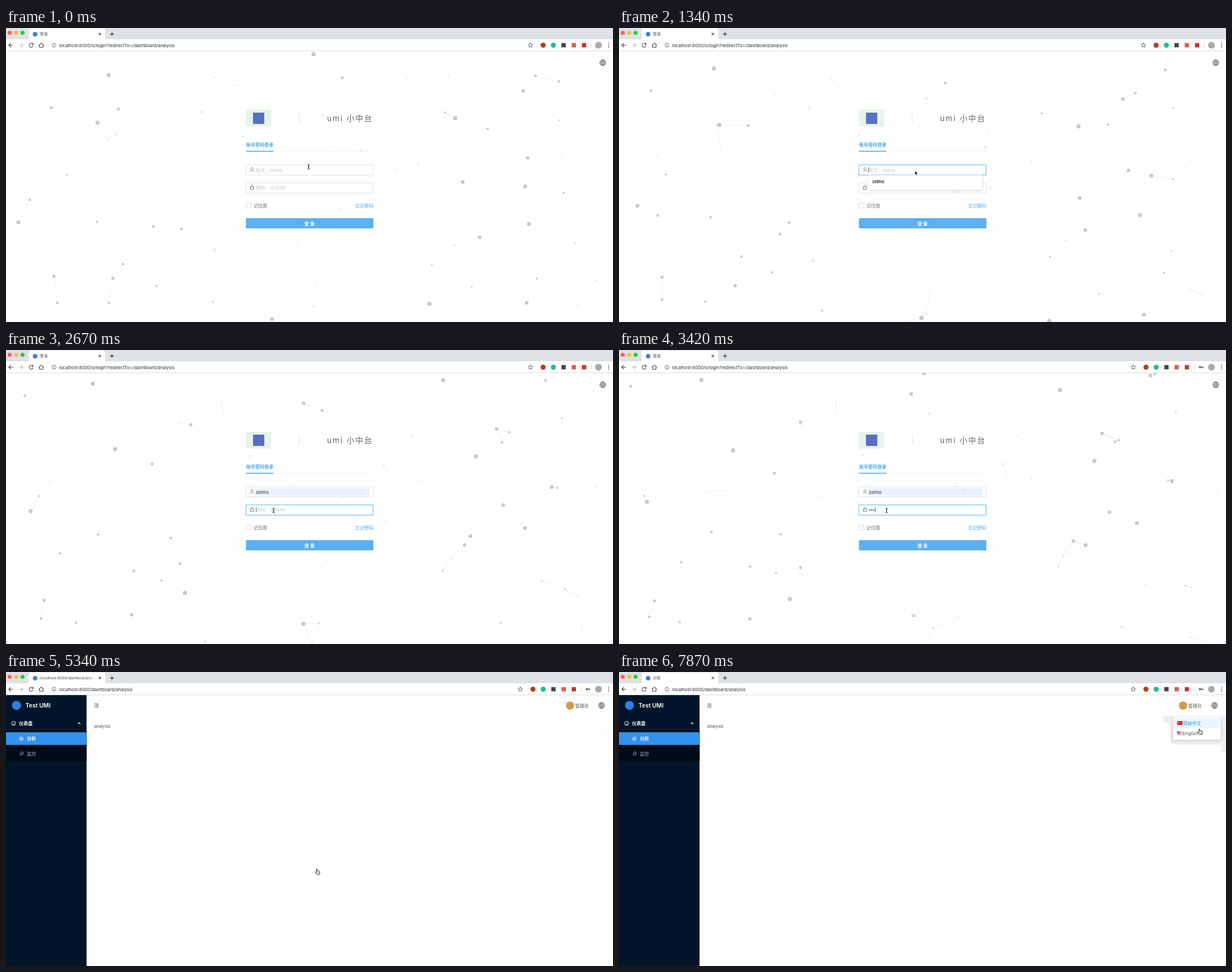
An HTML page with a canvas that plays this animation: 1074x521 px, repeating every 8 s.

```html
<!DOCTYPE html>
<html lang="zh">
<head>
<meta charset="utf-8">
<title>登录</title>
<style>
html, body { margin: 0; width: 100%; height: 100%; overflow: hidden; background: #fefefe; }
#stage { position: relative; width: 1074px; height: 521px; overflow: hidden; }
canvas { position: absolute; left: 0; top: 0; }
#words span {
  position: absolute; line-height: 0; white-space: pre;
  font-family: Inter, "Noto Sans CJK SC", "Noto Sans CJK", sans-serif;
}
</style>
</head>
<body>
<div id="stage">
  <canvas id="base" width="1074" height="521"></canvas>
  <div id="words"></div>
  <canvas id="top" width="1074" height="521"></canvas>
</div>
<script>
const W = 1074, H = 521, BAR = 41, LOOP = 8000, TICK = 148.1;
const USER = 'zelmo';
const base = document.getElementById('base').getContext('2d');
const over = document.getElementById('top').getContext('2d');
const words = document.getElementById('words');
let c = base;

// Timeline in ms
const AT = {
  focusUser: 440, list: 590, picked: 2220, focusPass: 2660, type: 3100,
  hover: 4440, dash: 5180, title: 5480, menu: 7100
};
const isLogin = t => t < AT.dash;
const isDash = t => t >= AT.dash;
const listOpen = t => t >= AT.list && t < AT.picked;
const clamp = (v, lo, hi) => Math.max(lo, Math.min(hi, v));
const typed = t => clamp(Math.floor((t - AT.type) / TICK) + 1, 0, 6);
const menuAlpha = t => clamp((t - AT.menu + 40) / 300, 0, 1);

// Shape helpers
function rect(x, y, w, h, fill, stroke) {
  if (fill) { c.fillStyle = fill; c.fillRect(x, y, w, h); }
  if (stroke) { c.strokeStyle = stroke; c.lineWidth = 1; c.strokeRect(x, y, w, h); }
}
function round(x, y, w, h, r, fill) {
  c.fillStyle = fill;
  c.beginPath(); c.roundRect(x, y, w, h, r); c.fill();
}
function disc(x, y, r, fill) {
  c.fillStyle = fill;
  c.beginPath(); c.arc(x, y, r, 0, 7); c.fill();
}
function ring(x, y, r, color, width = 1) {
  c.strokeStyle = color; c.lineWidth = width;
  c.beginPath(); c.arc(x, y, r, 0, 7); c.stroke();
}
function path(d, x, y, stroke, width = 1, fill) {
  const p = new Path2D(d);
  c.save();
  c.translate(x, y);
  if (fill) { c.fillStyle = fill; c.fill(p); }
  if (stroke) { c.strokeStyle = stroke; c.lineWidth = width; c.stroke(p); }
  c.restore();
}
function star(x, y, n, outer, inner, color) {
  c.beginPath();
  for (let i = 0; i < n * 2; i++) {
    const a = i * Math.PI / n - Math.PI / 2, r = i % 2 ? inner : outer;
    c.lineTo(x + r * Math.cos(a), y + r * Math.sin(a));
  }
  c.closePath();
  c.strokeStyle = color; c.lineWidth = .8; c.stroke();
}
function withShadow(color, blur, y, draw) {
  c.save();
  c.shadowColor = color; c.shadowBlur = blur; c.shadowOffsetY = y;
  draw();
  c.restore();
}

// Text: x is the left edge, y the middle of the capitals
const labels = [];
function label(str, x, y, size, color, show, css = {}) {
  const el = document.createElement('span');
  el.textContent = str;
  Object.assign(el.style, { left: x + 'px', top: y + 'px', fontSize: size + 'px', color }, css);
  words.append(el);
  labels.push({ el, show });
}
const bold = { fontWeight: 600 };
const fade = {
  width: '98px', height: '12px', lineHeight: '12px', overflow: 'hidden', marginTop: '-6px',
  maskImage: 'linear-gradient(90deg,#000 88%,transparent)'
};
const host = 'localhost:8000', page = host + '/dashboard/analysis';
label('登录', 60, 10.7, 7, '#45494d', isLogin);
label(page, 60, 10.7, 6.75, '#45494d', t => isDash(t) && t < AT.title, fade);
label('分析', 60, 10.7, 7, '#45494d', t => t >= AT.title);
label(host + '/o/login?redirectTo=/dashboard/analysis', 94, 30.5, 7.8, '#2b2d30', isLogin);
label(page, 94, 30.5, 7.8, '#2b2d30', isDash);

label('umi 小中台', 568, 159.5, 13.5, '#666', isLogin, { letterSpacing: '2px' });
label('账号密码登录', 425, 207, 8, '#4aa8ef', isLogin, bold);
label('账号：' + USER, 442, 251.5, 8, '#c6c6c6', t => t < AT.picked);
label(USER, 442, 251.5, 8, '#333', t => t >= AT.picked && isLogin(t));
label('密码：123456', 442, 283, 8, '#c6c6c6', t => !listOpen(t) && t < AT.type);
label(USER, 448, 273.3, 7.4, '#222', listOpen, bold);
label('记住我', 438, 314.5, 8, '#6a6a6a', isLogin);
label('忘记密码', 618, 314.5, 8, '#46a3ee', isLogin);
label('登 录', 528, 346.5, 8, '#fff', isLogin, bold);

label('Test UMI', 34.5, 59.7, 10.4, '#fff', isDash, bold);
label('仪表盘', 23, 91, 8, '#fff', isDash, bold);
label('分析', 37, 118, 8, '#fff', isDash, bold);
label('监控', 37, 145, 8, '#a9b0b7', isDash);
label('analysis', 156, 97, 7.6, '#555', isDash);
label('管理员', 1007, 59.5, 8, '#555', isDash);
label('简体中文', 998, 91, 8, '#2492f2', menuAlpha);
label('English', 997.5, 109, 8, '#555', menuAlpha);

// Drifting dots: one per cell of a loose grid, each on a straight course
let seed = 77;
const rnd = () => (seed = seed * 16807 % 2147483647) / 2147483647;
const COLS = 11, ROWS = 7, REACH = 72, MARGIN = 8;
const dots = Array.from({ length: COLS * ROWS }, (_, i) => ({
  x: (i % COLS + rnd()) * W / COLS,
  y: BAR + (Math.floor(i / COLS) + rnd()) * (H - BAR) / ROWS,
  vx: (rnd() - .5) * 46, vy: (rnd() - .5) * 46,
  r: .6 + 3.2 * rnd() ** 1.3
}));
// Leaves on one side, returns on the other
const wrap = (v, lo, hi) => {
  const span = hi - lo + 2 * MARGIN;
  return lo - MARGIN + (((v - lo + MARGIN) % span) + span) % span;
};

function drawDots(sec, strength) {
  const pts = dots.map(d => ({
    x: wrap(d.x + d.vx * sec, 0, W), y: wrap(d.y + d.vy * sec, BAR, H), r: d.r
  }));
  c.strokeStyle = '#c4c4c4';
  c.lineWidth = .5;
  pts.forEach((a, i) => {
    for (const b of pts.slice(i + 1)) {
      const d = Math.hypot(a.x - b.x, a.y - b.y);
      if (d > REACH) continue;
      c.globalAlpha = strength * (1 - d / REACH);
      c.beginPath(); c.moveTo(a.x, a.y); c.lineTo(b.x, b.y); c.stroke();
    }
  });
  c.globalAlpha = strength;
  for (const p of pts) disc(p.x, p.y, p.r, '#c9c9c9');
}

// Dots are dimmed inside the sign-in panel
function drawField(t) {
  for (const inside of [false, true]) {
    c.save();
    c.beginPath();
    if (!inside) c.rect(0, BAR, W, H - BAR);
    c.rect(332, 110, 410, 360);
    c.clip('evenodd');
    drawDots(t / 1000, inside ? .28 : 1);
    c.restore();
  }
}

function drawGlobe(x, y) {
  ring(x, y, 5.2, '#555', .9);
  path('M-5 0H5M0-5V5M-4.3-2.6H4.3M-4.3 2.6H4.3', x, y, '#555', .7);
  c.beginPath(); c.ellipse(x, y, 2.5, 5.2, 0, 0, 7); c.stroke();
}

function drawBrowser(t) {
  rect(0, 0, W, 20, '#dee1e6');
  ['#ff5f57', '#febc2e', '#28c840'].forEach((f, i) => disc(6.5 + i * 11.4, 8.5, 3.6, f));
  round(40, 1, 135.5, 24, 4, '#fff');
  rect(0, 20, W, 20, '#fff');
  rect(0, 40, W, 1, '#dadce0');
  disc(51.5, 11, 4, '#3b82d8');
  path('M-2-2L2 2M2-2L-2 2', 166, 10.7, '#444', 1.1);
  path('M-3.5 0H3.5M0-3.5V3.5', 187.5, 10.7, '#333', 1.2);

  const y = 30.5;
  path('M4 0H-3.5M0-3.5L-3.5 0L0 3.5', 8.5, y, '#444', 1.1);
  path('M-4 0H3.5M0-3.5L3.5 0L0 3.5', 26.5, y, '#bbb', 1.1);
  path('M2.7-2.2A3.5 3.5 0 1 0 3.4 1M3.4-4V-1.2H.6', 44.5, y, '#444', 1.1);
  path('M-4.3.2L0-3.8L4.3.2M-3-.6V3.8H3V-.6', 62.5, y, '#444', 1.1);
  ring(85, y, 3.5, '#555', .8);
  path('M0-2V-1M0-.3V2', 85, y, '#555', .9);

  // The key pushes the add-on icons to the left
  const hasKey = t >= AT.type, left = hasKey ? 910 : 928;
  star(left, y, 5, 4.4, 2, '#444');
  ['#b0401f', '#1cbf8f', '#444', '#e35a50', '#cc3428'].forEach((fill, i) => {
    const x = left + 22.4 + i * 18.1;
    if (i < 2) disc(x, y, 4.5, fill);
    else rect(x - 3.8, y - 3.8, 7.6, 7.6, fill);
  });
  rect(left + 107, 26, .8, 9, '#d0d3d8');
  if (hasKey) {
    ring(1028, 30.3, 1.5, '#444', 1.3);
    path('M1.6 0H6M4.8 0V2', 1028, 30.3, '#444', 1.3);
  }
  disc(1048.3, y, 6, '#a9aaa9');
  for (const dy of [-3.4, 0, 3.4]) disc(1066.3, y + dy, .9, '#444');
}

function drawInput(y, focused) {
  const box = () => rect(424.5, y, 225, 18, '#fefefe', focused ? '#74c0f4' : '#e4e4e4');
  if (focused) withShadow('rgba(70,165,240,.25)', 2, 0, box);
  else box();
}

function drawLogin(t) {
  rect(424.5, 145, 44.5, 29.5, '#e6f4e8');
  rect(437, 150, 20, 20, '#5870c4');
  rect(518.3, 151.5, 1, 16.5, '#ddd');
  rect(424.5, 218.6, 225.5, .7, '#ececec');
  rect(424.5, 217.6, 48.5, 1.7, '#4fabf0');

  const userFocus = t >= AT.focusUser && t < AT.focusPass;
  const passFocus = t >= AT.focusPass;
  drawInput(242.5, userFocus);
  drawInput(274.5, passFocus);
  if (t >= AT.picked) rect(440.5, 245, 203, 13, '#eaf1fd');

  ring(435.2, 249.3, 2, '#777', .8);
  path('M-3.3 3.7C-3-.1 3-.1 3.3 3.7', 435.2, 251.3, '#777', .8);
  rect(432.3, 281.8, 5.8, 4.2, null, '#777');
  path('M-1.7 0V-1.4A1.7 1.7 0 0 1 1.7-1.4V0', 435.2, 281.6, '#777', .8);
  const count = typed(t), step = 3.65;
  for (let i = 0; i < count; i++) disc(443.4 + i * step, 283.5, 1.3, '#666');

  const typing = count > 0 && count < 6, blink = t % 1200 < 700;
  if (userFocus && t < AT.picked && blink) rect(441.3, 247, .8, 9, '#333');
  if (passFocus && (typing || blink)) rect(442 + count * step, 278.5, .8, 9, '#333');

  rect(425, 310.5, 8.5, 8.5, '#fefefe', '#dcdcdc');
  round(424.5, 337, 225.5, 18, 1, t >= AT.hover ? '#73c6f9' : '#5bb0f2');

  drawField(t);

  if (listOpen(t)) {
    withShadow('rgba(0,0,0,.4)', 3, .8, () => rect(441.5, 260.5, 201.5, 27, '#fff'));
  }
  drawGlobe(1056, 61.5);
}

function drawMenu(t) {
  const alpha = menuAlpha(t);
  if (!alpha) return;
  c.save();
  c.globalAlpha = alpha;
  rect(963, 78, 18, 12.5, '#efeff1');
  rect(1065, 78, 9, 64, '#f0f0f2');
  round(975, 84, 94, 45, 8, '#eeeef0');
  withShadow('rgba(0,0,0,.18)', 5, 1, () => round(980.5, 79.5, 84.5, 40.5, 2, '#fff'));
  rect(980.5, 82, 84.5, 18, '#e8f7fd');
  rect(987.5, 87, 9.5, 6.8, '#d6292c');
  disc(989.8, 89.2, 1, '#f5d13c');
  for (let i = 0; i < 7; i++) rect(987.5, 105 + i, 9.5, 1, i % 2 ? '#f6eeee' : '#dd7a80');
  rect(987.5, 105, 4.5, 4, '#6577b5');
  c.restore();
}

function drawDash(t) {
  rect(0, BAR, 142.5, H, '#001529');
  disc(18.5, 59.2, 8, '#2f7fe6');
  rect(0, 104, 142.5, 54.5, '#000c17');
  rect(0, 106.7, 142.5, 22.5, '#3391ee');
  ring(13.5, 91, 3.6, '#fff', .9);
  path('M0 .8L1.6-1.2M-1.8 2.4H1.8', 13.5, 91, '#fff', .9);
  path('M-2 1.2L0-1L2 1.2', 129.5, 91, '#fff', 1.2);
  for (const r of [3.6, 1.7]) star(27, 118, 5, r, r * .81, '#fff');
  ring(28, 144.2, 2.7, '#a9b0b7', .8);
  path('M-2 2L-4 4M-.8-.3L.2.7L1.4-.6', 28, 144.2, '#a9b0b7', .8);
  path('M-3.5-3H3.5M-.7-1H3.5M-.7 1H3.5M-3.5 3H3.5', 160, 59.3, '#555', .9);
  path('M-3.4-1.4L-1.6 0L-3.4 1.4Z', 160, 59.3, null, 1, '#555');
  disc(998, 59.5, 7.3, '#d39a4e');
  drawGlobe(1053.7, 59.3);
  drawMenu(t);
}

// Pointer moves: start, end, then where it rests
const moves = [
  [150, 450, 526, 249], [1190, 1780, 508.5, 272], [2220, 2670, 473.5, 284.5],
  [3900, 4600, 551, 354], [5800, 6080, 521, 335], [6080, 6960, 1053, 54], [7600, 7850, 1028, 106]
];
function pointerAt(t) {
  let x = 535.5, y = 246;
  for (const [from, to, px, py] of moves) {
    const u = clamp((t - from) / (to - from), 0, 1), e = u * u * (3 - 2 * u);
    x += (px - x) * e;
    y += (py - y) * e;
  }
  return [x, y];
}
function drawPointer(t) {
  const [x, y] = pointerAt(t);
  const arrow = (t > 1300 && t < 2600) || (t > 4050 && t < AT.hover) || (t > 5900 && t < 6950);
  if (arrow) {
    path('M0 0V8.2L1.9 6.5L3.2 9.3L4.6 8.7L3.4 6H5.9Z', x, y, '#fff', 1, '#111');
  } else if (t < AT.hover) {
    const beam = 'M-2-4Q0-4 0-2.8Q0-4 2-4M0-3V3M-2 4Q0 4 0 2.8Q0 4 2 4M-1 0H1';
    path(beam, x, y, '#fff', 2);
    path(beam, x, y, '#111', 1);
  } else {
    path('M-2-4.5Q-1.2-5.4-.5-4.4L.3-1.8L3.5-1.1Q4.6-.8 4.2 1L3.4 4.7H-1L-3.7 1Q-4-.4-2.5.2L-1.3 1Z',
      x, y, '#222', 1, '#fff');
    path('M.5 1V3M2 1V3', x, y, '#555', .6);
  }
}

function frame(now) {
  const t = Math.floor(now % LOOP / TICK) * TICK;
  c = base;
  rect(0, 0, W, H, '#fefefe');
  if (isLogin(t)) drawLogin(t); else drawDash(t);
  drawBrowser(t);
  c = over;
  c.clearRect(0, 0, W, H);
  drawPointer(t);
  for (const { el, show } of labels) el.style.opacity = +show(t);
}

let start;
function loop(now) {
  start ??= now;
  frame(now - start);
  requestAnimationFrame(loop);
}
frame(0);
requestAnimationFrame(loop);
</script>
</body>
</html>
```
